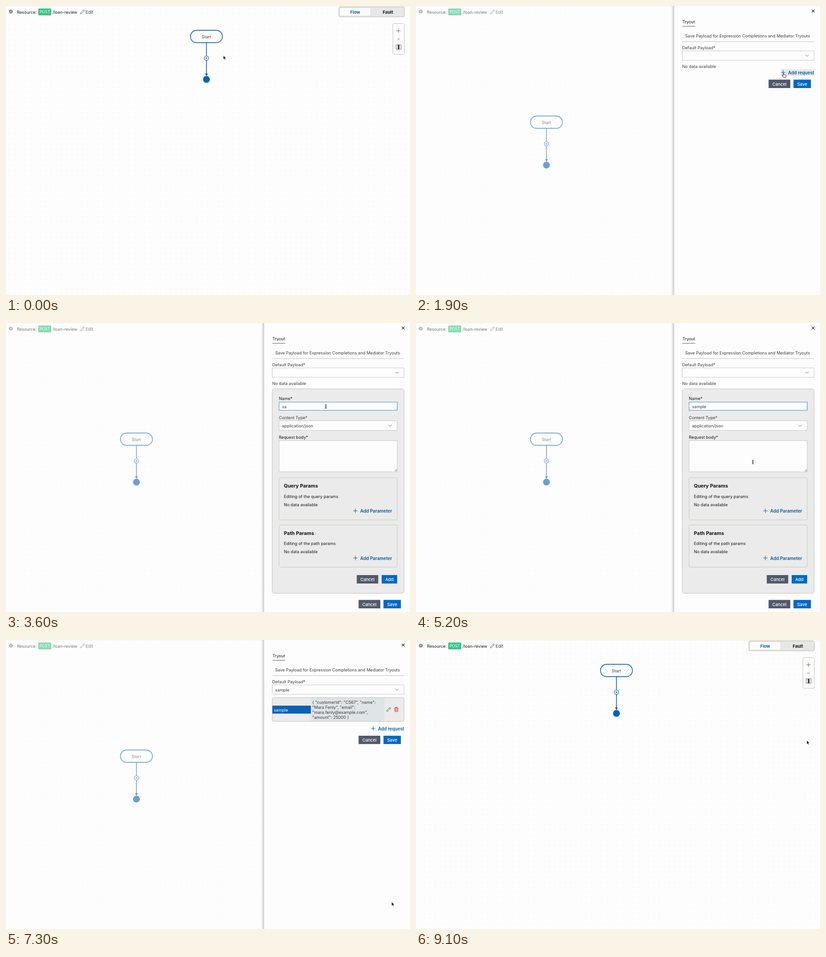
An HTML page that plays this animation: 884 by 634 pixels, repeating every 9200 ms.

```html
<!DOCTYPE html>
<html lang="en">
<head>
<meta charset="utf-8">
<title>Payload tryout</title>
<style>
  html, body { margin: 0; width: 100%; height: 100%; overflow: hidden; background: #fdfdfd; }
  svg { display: block; }
  text { font: 9.1px Inter, Roboto, sans-serif; fill: #3c3c3c; dominant-baseline: central; white-space: pre; }
  .dark { fill: #161616; }
  .bold { font-size: 9.4px; font-weight: 700; }
  .head { font-size: 10.8px; font-weight: 700; fill: #111; }
  .btn { font-size: 9.3px; font-weight: 500; fill: #fff; text-anchor: middle; }
  .link { font-size: 9.7px; font-weight: 600; fill: #005a9e; }
  .mid { text-anchor: middle; }
  .line { fill: none; stroke: #555; stroke-width: .9; }
  .field { fill: #fdfdfd; stroke: #c6c8c4; }
  .card { fill: #ebebeb; stroke: #bfc2b6; }
  .focus { fill: none; stroke: #3794d1; }
  .blue { fill: #0a62b5; }
  .grey { fill: #515a6b; }
  .go { fill: #0068c3; }
  .hot { fill: #004f91; }

  /* Timeline: 1% is 92 ms */
  .a { animation: 9.2s step-end infinite; }
  .flow { animation-name: flow; }
  .veil { animation-name: veil; }
  .panel { animation-name: panel; }
  .empty { animation-name: empty; }
  .form { animation-name: form; }
  .list { animation-name: list; }
  .request { animation-name: request; }
  .finish { animation-name: finish; }
  .hover-request { animation-name: hoverRequest; }
  .hover-add { animation-name: hoverAdd; }
  .hover-save { animation-name: hoverSave; }
  .name-focus { animation-name: nameFocus; }
  .body-focus { animation-name: bodyFocus; }
  .pasted { animation-name: pasted; }
  .lower { animation-name: lower; }
  .tall-card { animation-name: tallCard; }
  .tall-body { animation-name: tallBody; }
  .caret { animation: 1s step-end -.1s infinite blink; }
  .typed tspan { fill-opacity: 0; animation: type 9.2s step-end infinite; animation-delay: calc(var(--i) * .17s); }
  .cursor { animation-name: move; animation-timing-function: ease-in-out; }
  .arrow { animation-name: arrow; }
  .hand { animation-name: hand; }
  .beam { animation-name: beam; }

  @keyframes flow {
    0%, 95.65% { transform: none; }
    11.96% { transform: translate(-153.2px, 188px); }
  }
  @keyframes veil { 0%, 93.48% { opacity: 0; } 11.96% { opacity: 1; } }
  @keyframes panel {
    0%, 100% { transform: translateX(330px); }
    11.96% { transform: translateX(330px); animation-timing-function: ease-out; }
    14.13% { transform: none; }
    93.48% { transform: none; animation-timing-function: ease-in; }
    95.65% { transform: translateX(330px); }
  }
  @keyframes empty { 0% { opacity: 1; } 77.17%, 100% { opacity: 0; } }
  @keyframes form { 0%, 77.17% { opacity: 0; } 22.83% { opacity: 1; } }
  @keyframes list { 0% { opacity: 0; } 77.17%, 100% { opacity: 1; } }
  @keyframes request {
    0% { opacity: 1; transform: none; }
    22.83% { opacity: 0; transform: none; }
    77.17%, 100% { opacity: 1; transform: translateY(48.5px); }
  }
  @keyframes finish {
    0% { transform: none; }
    22.83% { transform: translateY(446px); }
    64.13% { transform: translateY(468px); }
    77.17%, 100% { transform: translateY(48.5px); }
  }
  @keyframes hoverRequest { 0%, 22.83% { opacity: 0; } 18.6% { opacity: 1; } }
  @keyframes hoverAdd { 0%, 77.17% { opacity: 0; } 71.7% { opacity: 1; } }
  @keyframes hoverSave { 0% { opacity: 0; } 87%, 100% { opacity: 1; } }
  @keyframes nameFocus { 0%, 59.78% { opacity: 0; } 32.6% { opacity: 1; } }
  @keyframes bodyFocus { 0%, 77.17% { opacity: 0; } 59.78% { opacity: 1; } }
  @keyframes pasted { 0% { opacity: 0; } 64.13%, 100% { opacity: 1; } }
  @keyframes lower { 0% { transform: none; } 64.13%, 100% { transform: translateY(22px); } }
  @keyframes tallCard { 0% { height: 448.5px; } 64.13%, 100% { height: 470.5px; } }
  @keyframes tallBody { 0% { height: 68.5px; } 64.13%, 100% { height: 90.5px; } }
  @keyframes blink { 0% { opacity: 0; } 50% { opacity: 1; } }
  @keyframes type { 0%, 90% { fill-opacity: 0; } 36.9% { fill-opacity: 1; } }
  @keyframes move {
    0%, 5.4% { transform: translate(475.5px, 108.5px); }
    9.8%, 13% { transform: translate(441px, 70px); }
    19.6%, 25% { transform: translate(804px, 147px); }
    30.4%, 48% { transform: translate(700px, 183px); }
    54.3%, 65.5% { transform: translate(737px, 305px); }
    72.8%, 78.3% { transform: translate(843.5px, 583px); }
    88%, 100% { transform: translate(855px, 220px); }
  }
  @keyframes arrow {
    0%, 14%, 22.83%, 77.17%, 93.48% { opacity: 1; }
    9%, 18.6%, 29%, 87% { opacity: 0; }
    68% { opacity: 1; }
    71.7% { opacity: 0; }
    49.5% { opacity: 1; }
    53% { opacity: 0; }
  }
  @keyframes hand {
    0%, 14%, 22.83%, 77.17%, 93.48% { opacity: 0; }
    9%, 18.6%, 71.7%, 87% { opacity: 1; }
  }
  @keyframes beam {
    0%, 49.5%, 68% { opacity: 0; }
    29%, 53% { opacity: 1; }
  }
</style>
</head>
<body>
<svg width="884" height="634" viewBox="0 0 884 634">
  <defs>
    <pattern id="dots" x="7" y="6" width="11.4" height="11.4" patternUnits="userSpaceOnUse">
      <circle cx=".6" cy=".6" r=".55" fill="#d9dcd8"/>
    </pattern>
    <linearGradient id="shade">
      <stop offset="0" stop-color="#888" stop-opacity="0"/>
      <stop offset="1" stop-color="#888" stop-opacity=".42"/>
    </linearGradient>
    <path id="plus" d="M-4.7 0H4.7M0-4.7V4.7"/>
    <path id="chevron" d="M-3.5-1.7L0 1.8L3.5-1.7" class="line"/>
    <path id="pencil" d="M-4.2 4.4L-3.4 1.3L2.3-4.3Q3.4-4.9 4.2-3.9Q4.7-3 4-2.4L-1.6 3.4ZM1.4-3.4L3.2-1.5"/>
    <g id="params">
      <rect x="597.5" y="339.5" width="258.5" height="92.5" rx="3" fill="#ebebeb" stroke="#c6cabc"/>
      <text x="608" y="398" class="dark">No data available</text>
      <use href="#plus" x="764.5" y="412" stroke="#005a9e"/>
      <text x="775" y="412.5" class="link">Add Parameter</text>
    </g>
  </defs>

  <rect width="884" height="634" fill="#fdfdfd"/>
  <rect width="884" height="634" fill="url(#dots)"/>
  <rect width="884" height="1" fill="#f1f4dc"/>

  <g class="a flow">
    <rect x="403.6" y="53.4" width="70" height="27" rx="13.5" fill="#fdfdfd" stroke="#0a62b5" stroke-width="1.6"/>
    <text x="438.6" y="67" class="mid">Start</text>
    <path d="M438.6 81V150" stroke="#0a62b5" stroke-width="1.6"/>
    <path d="M435.4 148H441.8L438.6 154Z" class="blue"/>
    <circle cx="438.6" cy="114.5" r="4.8" fill="#fdfdfd" stroke="#0a62b5" stroke-width="1.1"/>
    <path d="M436 114.5H441.2M438.6 111.9V117.1" stroke="#0a62b5"/>
    <circle cx="438.6" cy="161" r="7.5" class="blue"/>
  </g>

  <g class="line">
    <circle cx="10.5" cy="12.3" r="3.5" stroke-width="1.4" stroke-dasharray="1.5 .7"/>
    <circle cx="10.5" cy="12.3" r="2.7"/>
    <circle cx="10.5" cy="12.3" r="1.1"/>
    <use href="#pencil" x="167.3" y="13"/>
  </g>
  <text x="24" y="13" class="dark">Resource:</text>
  <rect x="70.5" y="5.5" width="28.5" height="15" rx="1.5" fill="#36c285"/>
  <text x="84.8" y="13" class="mid" style="fill:#fff;font-size:8.5px">POST</text>
  <text x="102" y="13" class="dark">/loan-review</text>
  <text x="174" y="13" style="font-size:9.4px">Edit</text>

  <rect x="728.5" y="2" width="143" height="21.8" rx="2.5" fill="#e7e7e7" stroke="#b4b7ad"/>
  <rect x="731" y="4.8" width="66" height="16" rx="2.5" fill="#fcfcfc"/>
  <text x="764" y="13" class="bold mid" style="fill:#0a62b5">Flow</text>
  <text x="835.5" y="13" class="bold mid dark">Fault</text>
  <rect x="846.5" y="38.5" width="25" height="67.5" rx="2.5" fill="#fdfdfd" stroke="#bfc2b8"/>
  <use href="#plus" x="858.7" y="54.3" class="line"/>
  <path d="M856.4 72.5H861.4" class="line"/>
  <path d="M853.8 85.3H864.3V94.8H853.8Z" class="line"/>
  <path d="M857.2 85H861V95H857.2Z" fill="#444"/>

  <rect width="884" height="634" fill="#fdfdfd" fill-opacity=".4" class="a veil" opacity="0"/>

  <g class="a panel">
    <rect x="558" width="7" height="634" fill="url(#shade)"/>
    <rect x="565" width="319" height="634" fill="#fdfdfd"/>
    <path d="M866 8L872 14M872 8L866 14" stroke="#222" stroke-width="1.1"/>
    <text x="583" y="34.5" class="dark">Tryout</text>
    <path d="M583 44.5H611" stroke="#555b66"/>
    <text x="589" y="65.5">Save Payload for Expression Completions and Mediator Tryouts</text>
    <path d="M582.5 78H871" stroke="#bdbfb6"/>
    <text x="582.5" y="91">Default Payload*</text>
    <rect x="582.5" y="98.5" width="288.5" height="20.5" class="field"/>
    <use href="#chevron" x="855.5" y="108.7"/>
    <text x="582.5" y="132" class="a empty">No data available</text>

    <g class="a request">
      <rect x="798.5" y="138.5" width="73" height="15" fill="#e8e8e8" class="a hover-request"/>
      <use href="#plus" x="803.5" y="145.7" stroke="#005a9e"/>
      <text x="814" y="146" class="link">Add request</text>
    </g>

    <g class="a finish">
      <rect x="771.5" y="161.5" width="47.5" height="18.5" class="grey"/>
      <text x="795.2" y="171" class="btn">Cancel</text>
      <rect x="826" y="161.5" width="38" height="18.5" class="go"/>
      <rect x="826" y="161.5" width="38" height="18.5" class="a hot hover-save"/>
      <text x="845" y="171" class="btn">Save</text>
    </g>

    <g class="a form">
      <rect x="582.5" y="144.5" width="288.5" height="448.5" rx="5" class="a card tall-card"/>
      <text x="597" y="165" class="dark">Name*</text>
      <rect x="597.5" y="173.5" width="258.5" height="18" class="field"/>
      <rect x="597.5" y="173.5" width="258.5" height="18" class="a focus name-focus"/>
      <text x="604" y="182.5" class="typed"><tspan style="--i:0">s</tspan><tspan style="--i:1">a</tspan><tspan style="--i:2">m</tspan><tspan style="--i:3">p</tspan><tspan style="--i:4">l</tspan><tspan style="--i:5">e</tspan></text>
      <text x="597" y="207.5">Content Type*</text>
      <rect x="597.5" y="214.5" width="258.5" height="21" class="field"/>
      <text x="604" y="225">application/json</text>
      <use href="#chevron" x="840.5" y="225"/>
      <text x="597" y="250" class="dark">Request body*</text>
      <rect x="597.5" y="258" width="258.5" height="68.5" class="a field tall-body"/>
      <rect x="597.5" y="258" width="258.5" height="68.5" class="a focus tall-body" style="animation-name:tallBody,bodyFocus"/>
      <g class="a pasted">
        <text x="604" y="270.5">{</text>
        <text x="604" y="281.5">    "customerId": "C567",</text>
        <text x="604" y="292.5">    "name": "Mara Fenly",</text>
        <text x="604" y="303.5">    "email": "mara.fenly@example.com",</text>
        <text x="604" y="314.5">    "amount": 25000</text>
        <text x="604" y="325.5">}</text>
        <path d="M604.5 330V342" class="line caret"/>
      </g>

      <g class="a lower">
        <path d="M850.5 325L855 320.5M853 325.5L855.5 323" class="line"/>
        <use href="#params"/>
        <text x="608" y="357.5" class="head">Query Params</text>
        <text x="608" y="380" class="dark">Editing of the query params</text>
        <use href="#params" y="103.5"/>
        <text x="608" y="461" class="head">Path Params</text>
        <text x="608" y="483.5" class="dark">Editing of the path params</text>
        <rect x="767.5" y="553" width="47" height="18.5" class="grey"/>
        <text x="791" y="562.5" class="btn">Cancel</text>
        <rect x="822" y="553" width="34" height="18.5" class="go"/>
        <rect x="822" y="553" width="34" height="18.5" class="a hot hover-add"/>
        <text x="839" y="562.5" class="btn">Add</text>
      </g>
    </g>

    <g class="a list">
      <text x="589" y="109">sample</text>
      <rect x="582.5" y="126.5" width="288.5" height="52" rx="3" class="card"/>
      <rect x="667" y="127" width="161" height="51" fill="#dfe4e7"/>
      <rect x="583" y="144" width="84" height="17.5" class="blue"/>
      <text x="586" y="153" style="fill:#fff">sample</text>
      <text x="670" y="136.5">{ "customerId": "C567", "name":</text>
      <text x="670" y="147.5">"Mara Fenly", "email":</text>
      <text x="670" y="158.5">"mara.fenly@example.com",</text>
      <text x="670" y="169.5">"amount": 25000 }</text>
      <use href="#pencil" x="837.3" y="152.5" fill="none" stroke="#2c8a36"/>
      <path d="M849.5 149.5H858.5M852.3 149.3V147.8H855.7V149.3M850.6 149.7L851 157H857L857.4 149.7M852.8 151.5V155.3M855.2 151.5V155.3" fill="none" stroke="#d3212c"/>
    </g>
  </g>

  <g class="a cursor" stroke-linejoin="round">
    <path class="a arrow" d="M0 0V8.8L2 7L3.4 10.1L4.9 9.4L3.5 6.4H6.2Z" fill="#111" stroke="#fff" stroke-width=".7"/>
    <path class="a hand" d="M-.8 1Q0-.3 .9 1V4Q1.8 3.3 2.6 4.1Q3.6 3.5 4.3 4.5Q5.6 4.2 5.7 5.6Q5.7 8 4.6 10H.3Q-1 8.2-2.8 6Q-2.6 4.8-.8 6.2Z" fill="#fff" stroke="#111" stroke-width=".9"/>
    <path class="a beam" d="M-2-4.3Q0-4.3 0-3V3Q0 4.3-2 4.3M2-4.3Q0-4.3 0-3V3Q0 4.3 2 4.3M-1 1H1" fill="none" stroke="#222" stroke-width=".9"/>
  </g>
</svg>
</body>
</html>
```
